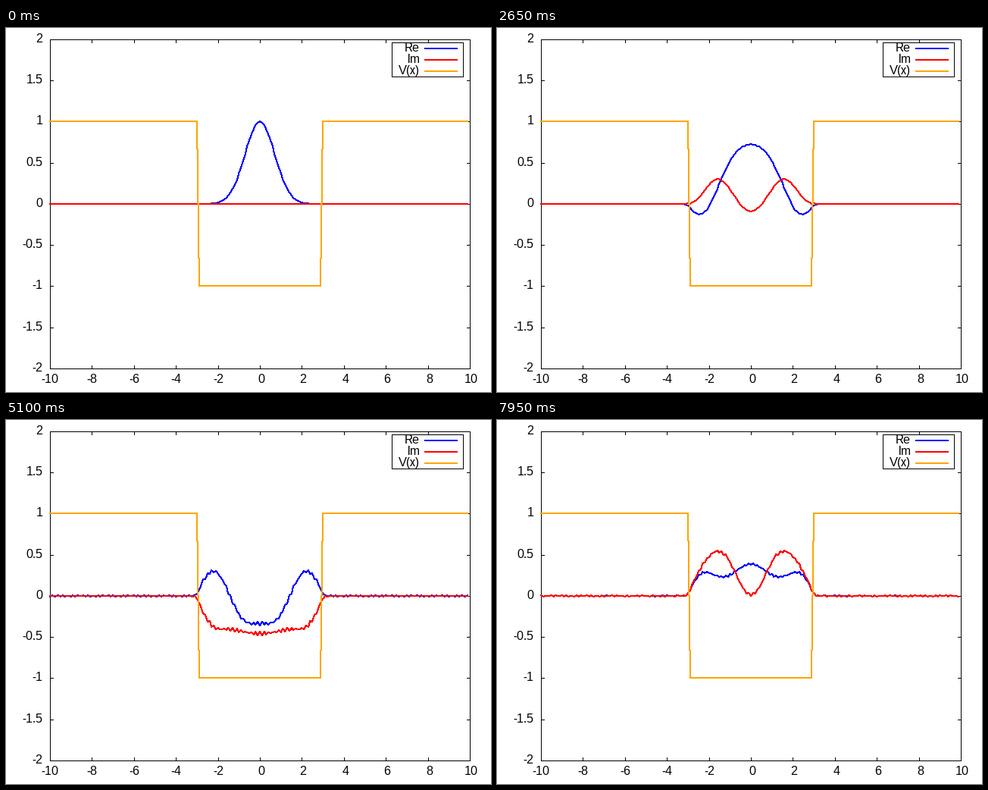
A matplotlib script for the animation above (8 s loop, 640 by 480 pixels).

```python
import numpy as np
import matplotlib.pyplot as plt
from matplotlib.animation import FuncAnimation
from matplotlib.patches import Rectangle

W, H, DPI = 640, 480, 100
LEFT, RIGHT, TOP, BOTTOM = 58, 612, 15, 449
FRAMES, INTERVAL = 160, 50
PX = 72 / DPI  # one pixel in points

plt.rcParams["font.family"] = "Liberation Sans"
plt.rcParams["text.hinting"] = "default"
plt.rcParams["text.hinting_factor"] = 1


def to_px(x):
    return LEFT + np.floor((x + 10) * (RIGHT - LEFT) / 20 + 0.5)


def to_py(y):
    return BOTTOM - np.floor((y + 2) * (BOTTOM - TOP) / 4 + 0.5)


# Split-step Fourier solution of a Gaussian in a square well
N, DX, DT, DEPTH = 200, 0.1, 0.015, 40.0
site = np.arange(N) - N // 2
x = site * DX
well = np.where(np.abs(site) < 30, -1.0, 1.0)
k = 2 * np.pi * np.fft.fftfreq(N, 1 / N) / (x[-1] - x[0])
half_kick = np.exp(-0.5j * DEPTH * well * DT)
drift = np.exp(-0.5j * k**2 * DT)


def evolve(psi, steps):
    states = [psi]
    for _ in range(steps - 1):
        psi = half_kick * np.fft.ifft(drift * np.fft.fft(half_kick * psi))
        states.append(psi)
    return states


states = evolve(np.exp(-x**2).astype(complex), FRAMES)

fig = plt.figure(figsize=(W / DPI, H / DPI), dpi=DPI, facecolor="white")
ax = fig.add_axes([0, 0, 1, 1])
ax.set_xlim(0, W)
ax.set_ylim(H, 0)
ax.axis("off")


def thin(xs, ys):
    ax.plot(xs, ys, color="black", lw=PX, antialiased=False, snap=False,
            zorder=1, solid_capstyle="butt")


def label(px, py, text, ha):
    ax.text(px, py, text, ha=ha, va="baseline", fontsize=16 * PX, color="black")


def frame_box(x0, y0, x1, y1):
    ax.add_patch(Rectangle((x0 + 0.5, y0 + 0.5), x1 - x0, y1 - y0, fill=False,
                           ec="black", lw=PX, antialiased=False, snap=False,
                           zorder=1))


def trace(xs, ys):
    """Every pixel on the polyline, one step per column or row."""
    parts = []
    for x0, y0, x1, y1 in zip(xs[:-1], ys[:-1], xs[1:], ys[1:]):
        n = int(max(abs(x1 - x0), abs(y1 - y0)))
        s = np.arange(n + 1) / n
        parts.append([x0 + s * (x1 - x0), y0 + s * (y1 - y0)])
    return np.floor(np.concatenate(parts, axis=1) + 0.5)


def curve(xs, ys, color):
    """A line stamped with a square two-pixel brush."""
    line, = ax.plot(*trace(xs, ys), color=color, ls="none", marker="s",
                    ms=2.02 * PX, mew=0, mec="none", antialiased=False,
                    zorder=3)
    return line


frame_box(LEFT, TOP, RIGHT, BOTTOM)
for v in range(-10, 11, 2):
    px = to_px(v) + 0.5
    thin([px, px], [BOTTOM - 4, BOTTOM + 1])
    thin([px, px], [TOP, TOP + 5])
    label(px + (1.5 if v >= 0 else -0.5), 468, str(v), "center")
for v in np.arange(-2, 2.5, 0.5):
    py = to_py(v) + 0.5
    thin([LEFT, LEFT + 5], [py, py])
    thin([RIGHT - 4, RIGHT + 1], [py, py])
    label(48.5, py + 3.5, f"{v:g}", "right")

xs = to_px(x)
re_line = curve(xs, to_py(states[0].real), "#0000ff")
im_line = curve(xs, to_py(states[0].imag), "#ff0000")
curve(xs, to_py(well), "#ffa500")

frame_box(509, 19, 603, 64)
legend = [("Re", "#0000ff", 27), ("Im", "#ff0000", 42), ("V(x)", "#ffa500", 57)]
for name, color, py in legend:
    label(546, py + 4, name, "right")
    curve([553, 595], [py, py], color)


def update(i):
    re_line.set_data(*trace(xs, to_py(states[i].real)))
    im_line.set_data(*trace(xs, to_py(states[i].imag)))
    return re_line, im_line


anim = FuncAnimation(fig, update, frames=FRAMES, interval=INTERVAL,
                     repeat=True, repeat_delay=0)
plt.show()
```
